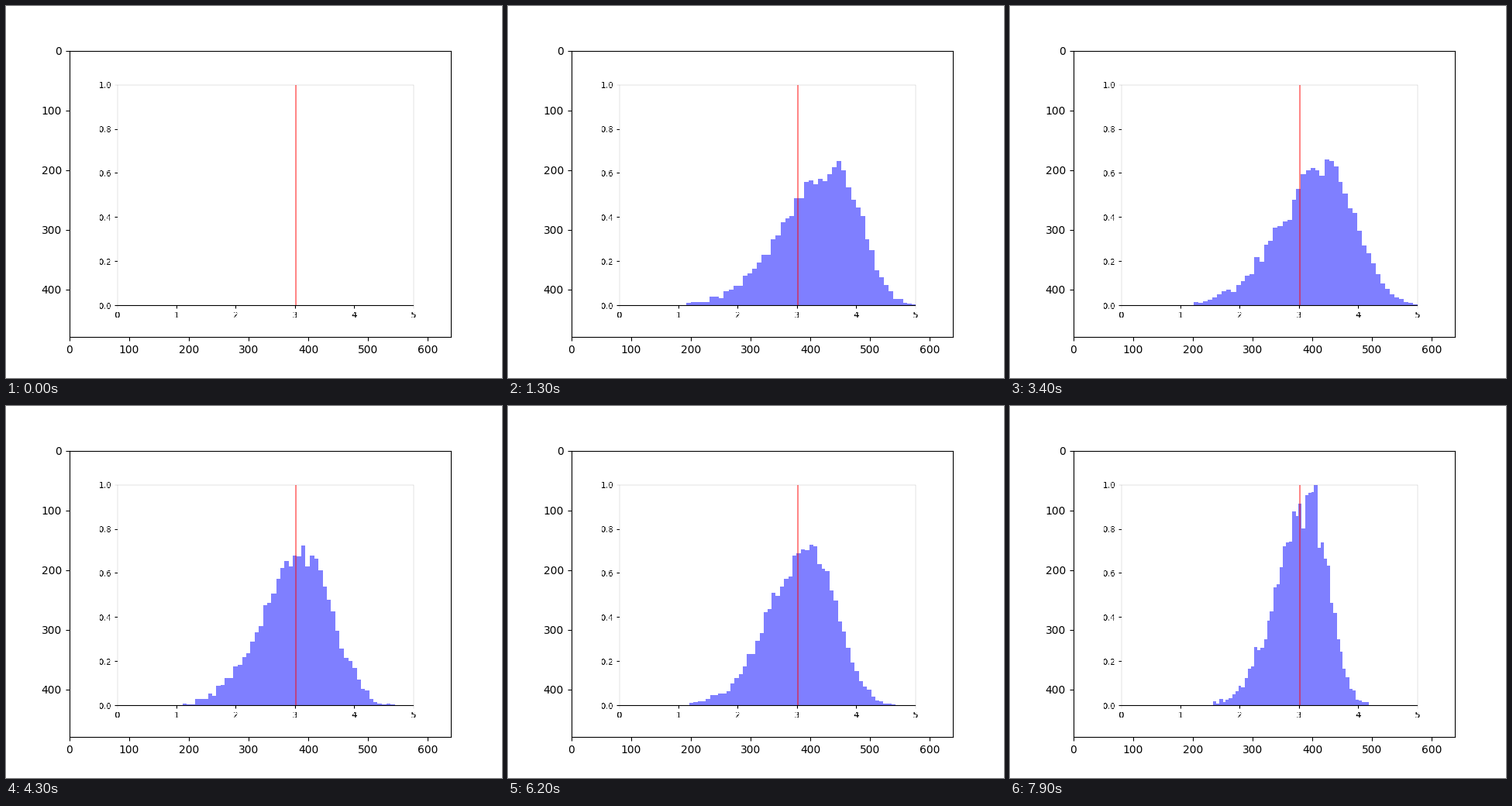
A matplotlib script for the animation above (8000 ms loop, 640 by 480 pixels).

```python
import numpy as np
import matplotlib.pyplot as plt
from matplotlib.animation import FuncAnimation

FRAMES, INTERVAL = 80, 100
BINS, SAMPLES = 50, 10000
MARK = 3.014

# step, mode, spread to the left, spread to the right
KEYS = np.array([
    (1, 0, .08, .06),
    (8, 1.3, .31, .19),
    (13, 3.65, .84, .44),
    (25, 3.8, .87, .51),
    (43, 3.2, .7, .45),
    (62, 3.25, .69, .43),
    (79, 3.2, .55, .31),
])


def histogram(step):
    """Bin edges and densities of a two-sided normal sample at one step."""
    mode, left, right = (np.interp(step, KEYS[:, 0], col)
                         for col in KEYS[:, 1:].T)
    edges = np.linspace(mode - 3 * left, mode + 3.3 * right, BINS + 1)
    offset = (edges[:-1] + edges[1:]) / 2 - mode
    p = np.exp(-.5 * (offset / np.where(offset < 0, left, right)) ** 2)
    counts = np.random.default_rng(step).multinomial(SAMPLES, p / p.sum())
    return edges, counts / (SAMPLES * np.diff(edges))


def render_plots(fig):
    """Draw the histogram plot at every step and return the rasters."""
    ax = fig.add_subplot()
    bars = ax.bar(np.zeros(BINS), np.zeros(BINS), color="b", alpha=.5)
    ax.axvline(MARK, color="r", alpha=.5, linewidth=2)
    ax.set(xlim=(0, 5), ylim=(0, 1))
    shots = []
    for step in range(FRAMES):
        edges, heights = histogram(step)
        for bar, x, w, h in zip(bars, edges, np.diff(edges), heights):
            bar.set_bounds(x, 0, w, h)
            bar.set_visible(step > 0)
        fig.canvas.draw()
        shots.append(np.array(fig.canvas.buffer_rgba())[..., :3].copy())
    fig.clear()
    return shots


plt.rcParams["text.kerning_factor"] = 6
fig = plt.figure(figsize=(6.4, 4.8), dpi=100)
shots = render_plots(fig)

# The plot is shown as a picture inside a second set of axes.
image = fig.add_subplot().imshow(shots[0], interpolation="nearest")


def update(step):
    image.set_data(shots[step])
    return [image]


anim = FuncAnimation(fig, update, frames=FRAMES, interval=INTERVAL,
                     repeat=True, repeat_delay=0, blit=False)
plt.show()
```
